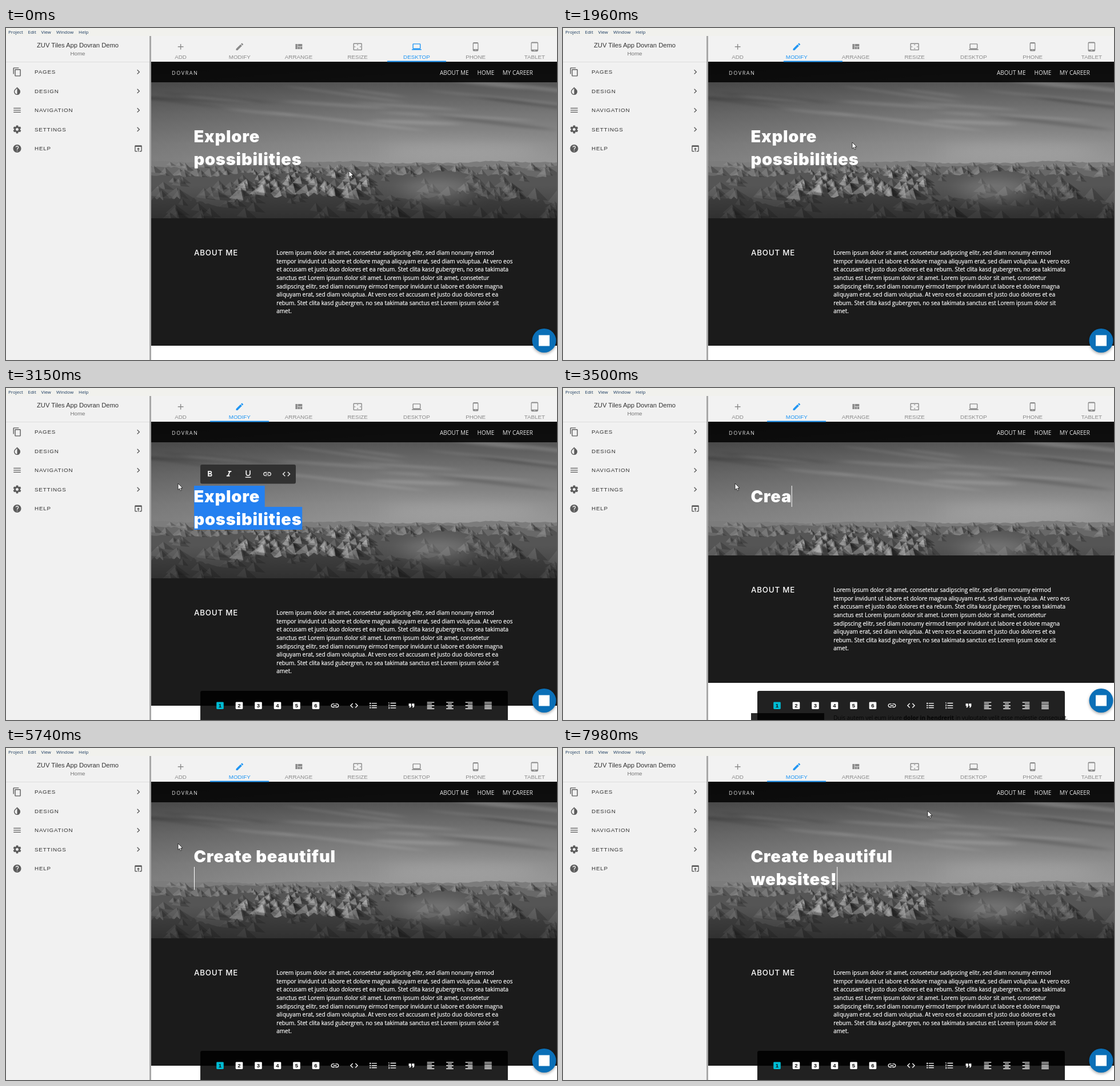
An HTML page that plays this animation: 964 by 581 pixels, repeating every 8000 ms.

```html
<!DOCTYPE html>
<html lang="en">
<head>
<meta charset="utf-8">
<title>Site editor</title>
<style>
  html, body { margin: 0; width: 100%; height: 100%; overflow: hidden; background: #fff; }
  svg { display: block; width: 100%; height: 100%; }
  text { white-space: pre; }
  .ui { font-family: "Liberation Sans", Arial, sans-serif; }
  .site { font-family: "Open Sans", "Noto Sans", sans-serif; }
  .head { font-family: Inter, Roboto, sans-serif; }
</style>
</head>
<body>
<svg id="stage" viewBox="0 0 964 581">
  <defs>
    <linearGradient id="sky" gradientUnits="userSpaceOnUse" x1="0" y1="60" x2="0" y2="240">
      <stop offset="0" stop-color="#484848"/>
      <stop offset=".2" stop-color="#575757"/>
      <stop offset=".5" stop-color="#777"/>
      <stop offset=".8" stop-color="#8f8f8f"/>
      <stop offset="1" stop-color="#989898"/>
    </linearGradient>
    <linearGradient id="side">
      <stop offset="0" stop-opacity=".16"/>
      <stop offset=".6" stop-opacity="0"/>
    </linearGradient>
    <linearGradient id="low" x2="0" y2="1">
      <stop offset="0" stop-opacity="0"/>
      <stop offset="1" stop-opacity=".3"/>
    </linearGradient>
    <filter id="soft" x="-50%" y="-200%" width="200%" height="500%"><feGaussianBlur stdDeviation="9 2"/></filter>
    <filter id="haze" x="-80%" y="-80%" width="260%" height="260%"><feGaussianBlur stdDeviation="22 12"/></filter>
    <filter id="drop" x="-30%" y="-30%" width="160%" height="160%"><feGaussianBlur stdDeviation="2.5"/></filter>
    <clipPath id="view"><rect x="254" y="59" width="710" height="522"/></clipPath>
  </defs>
</svg>
<script>
const LOOP = 8000, TICK = 70, BLUE = '#2196f3', GREY = '#8a8a8a';
const stage = document.getElementById('stage');

function el(tag, attrs, parent = stage) {
  const node = document.createElementNS('http://www.w3.org/2000/svg', tag);
  for (const k in attrs) node.setAttribute(k, attrs[k]);
  parent.appendChild(node);
  return node;
}
const rect = (x, y, width, height, fill, parent, more) =>
  el('rect', { x, y, width, height, fill, ...more }, parent);
function label(str, x, y, size, cls, fill, parent, more) {
  const node = el('text', { x, y, 'font-size': size, class: cls, fill, ...more }, parent);
  node.textContent = str;
  return node;
}
// 24-unit icon centred on a point
const icon = (d, cx, cy, parent, fill) =>
  el('path', { d, fill, transform: `translate(${cx - 8.4} ${cy - 8.4}) scale(.7)` }, parent);
const bars = (short, from) => [0, 1, 2, 3, 4]
  .map(i => i % 2 ? `M${from} ${3 + 4 * i}h${short}v2h-${short}z` : `M3 ${3 + 4 * i}h18v2h-18z`).join('');

const ICON = {
  copy: 'M16 1H4c-1.1 0-2 .9-2 2v14h2V3h12V1zm3 4H8c-1.1 0-2 .9-2 2v14c0 1.1.9 2 2 2h11c1.1 0 2-.9 2-2V7c0-1.1-.9-2-2-2zm0 16H8V7h11v14z',
  drop: 'M17.66 7.93L12 2.27 6.34 7.93c-3.12 3.12-3.12 8.19 0 11.31C7.9 20.8 9.95 21.58 12 21.58c2.05 0 4.1-.78 5.66-2.34 3.12-3.12 3.12-8.19 0-11.31zM12 19.59c-1.6 0-3.11-.62-4.24-1.76C6.62 16.69 6 15.19 6 13.59s.62-3.11 1.76-4.24L12 5.1v14.49z',
  menu: 'M3 18h18v-2H3v2zm0-5h18v-2H3v2zm0-7v2h18V6H3z',
  gear: 'M19.43 12.98c.04-.32.07-.64.07-.98s-.03-.66-.07-.98l2.11-1.65c.19-.15.24-.42.12-.64l-2-3.46c-.12-.22-.39-.3-.61-.22l-2.49 1c-.52-.4-1.08-.73-1.69-.98l-.38-2.65C14.46 2.18 14.25 2 14 2h-4c-.25 0-.46.18-.49.42l-.38 2.65c-.61.25-1.17.59-1.69.98l-2.49-1c-.23-.09-.49 0-.61.22l-2 3.46c-.13.22-.07.49.12.64l2.11 1.65c-.04.32-.07.65-.07.98s.03.66.07.98l-2.11 1.65c-.19.15-.24.42-.12.64l2 3.46c.12.22.39.3.61.22l2.49-1c.52.4 1.08.73 1.69.98l.38 2.65c.03.24.24.42.49.42h4c.25 0 .46-.18.49-.42l.38-2.65c.61-.25 1.17-.59 1.69-.98l2.49 1c.23.09.49 0 .61-.22l2-3.46c.12-.22.07-.49-.12-.64l-2.11-1.65zM12 15.5c-1.93 0-3.5-1.57-3.5-3.5s1.57-3.5 3.5-3.5 3.5 1.57 3.5 3.5-1.57 3.5-3.5 3.5z',
  help: 'M12 2C6.48 2 2 6.48 2 12s4.48 10 10 10 10-4.48 10-10S17.52 2 12 2zm1 17h-2v-2h2v2zm2.07-7.75l-.9.92C13.45 12.9 13 13.5 13 15h-2v-.5c0-1.1.45-2.1 1.17-2.83l1.24-1.26c.37-.36.59-.86.59-1.41 0-1.1-.9-2-2-2s-2 .9-2 2H8c0-2.21 1.79-4 4-4s4 1.79 4 4c0 .88-.36 1.68-.93 2.25z',
  open: 'M19 4H5c-1.11 0-2 .9-2 2v12c0 1.1.89 2 2 2h4v-2H5V8h14v10h-4v2h4c1.1 0 2-.9 2-2V6c0-1.1-.89-2-2-2zm-7 6l-4 4h3v6h2v-6h3l-4-4z',
  next: 'M10 6L8.59 7.41 13.17 12l-4.58 4.59L10 18l6-6z',
  add: 'M19 13h-6v6h-2v-6H5v-2h6V5h2v6h6v2z',
  edit: 'M3 17.25V21h3.75L17.81 9.94l-3.75-3.75L3 17.25zM20.71 7.04c.39-.39.39-1.02 0-1.41l-2.34-2.34c-.39-.39-1.02-.39-1.41 0l-1.83 1.83 3.75 3.75 1.83-1.83z',
  quilt: 'M10 18h5v-6h-5v6zm-6 0h5V5H4v13zm12 0h5v-6h-5v6zM10 5v6h11V5H10z',
  resize: 'M12.01 5.5L10 8h4l-1.99-2.5zM18 10v4l2.5-1.99L18 10zM6 10l-2.5 2.01L6 14v-4zm8 6h-4l2.01 2.5L14 16zm7-13H3c-1.1 0-2 .9-2 2v14c0 1.1.9 2 2 2h18c1.1 0 2-.9 2-2V5c0-1.1-.9-2-2-2zm0 16.01H3V4.99h18v14.02z',
  laptop: 'M20 18c1.1 0 1.99-.9 1.99-2L22 6c0-1.1-.9-2-2-2H4c-1.1 0-2 .9-2 2v10c0 1.1.9 2 2 2H0v2h24v-2h-4zM4 6h16v10H4V6z',
  phone: 'M16 1H8C6.34 1 5 2.34 5 4v16c0 1.66 1.34 3 3 3h8c1.66 0 3-1.34 3-3V4c0-1.66-1.34-3-3-3zm-2 20h-4v-1h4v1zm3.25-3H6.75V4h10.5v14z',
  tablet: 'M18 0H6C4.34 0 3 1.34 3 3v18c0 1.66 1.34 3 3 3h12c1.66 0 3-1.34 3-3V3c0-1.66-1.34-3-3-3zm-4 22h-4v-1h4v1zm5.25-3H4.75V3h14.5v16z',
  link: 'M3.9 12c0-1.71 1.39-3.1 3.1-3.1h4V7H7c-2.76 0-5 2.24-5 5s2.24 5 5 5h4v-1.9H7c-1.71 0-3.1-1.39-3.1-3.1zM8 13h8v-2H8v2zm9-6h-4v1.9h4c1.71 0 3.1 1.39 3.1 3.1s-1.39 3.1-3.1 3.1h-4V17h4c2.76 0 5-2.24 5-5s-2.24-5-5-5z',
  code: 'M9.4 16.6L4.8 12l4.6-4.6L8 6l-6 6 6 6 1.4-1.4zm5.2 0l4.6-4.6-4.6-4.6L16 6l6 6-6 6-1.4-1.4z',
  list: [5, 10.5, 16].map(y => `M3 ${y}h3v3h-3zM8 ${y + .5}h13v2h-13z`).join(''),
  steps: 'M2 17h2v.5H3v1h1v.5H2v1h3v-4H2v1zm1-9h1V4H2v1h1v3zm-1 3h1.8L2 13.1v.9h3v-1H3.2L5 10.9V10H2v1zm5-6v2h14V5H7zm0 14h14v-2H7v2zm0-6h14v-2H7v2z',
  quote: 'M6 17h3l2-4V7H5v6h3zm8 0h3l2-4V7h-6v6h3z',
  left: bars(12, 3), center: bars(10, 7), right: bars(12, 9), full: bars(18, 3),
  bold: 'M15.6 10.79c.97-.67 1.65-1.77 1.65-2.79 0-2.26-1.75-4-4-4H7v14h7.04c2.09 0 3.71-1.7 3.71-3.79 0-1.52-.86-2.82-2.15-3.42zM10 6.5h3c.83 0 1.5.67 1.5 1.5s-.67 1.5-1.5 1.5h-3v-3zm3.5 9H10v-3h3.5c.83 0 1.5.67 1.5 1.5s-.67 1.5-1.5 1.5z',
  italic: 'M10 4v3h2.21l-3.42 8H6v3h8v-3h-2.21l3.42-8H18V4z',
  under: 'M12 17c3.31 0 6-2.69 6-6V3h-2.5v8c0 1.93-1.57 3.5-3.5 3.5S8.5 12.93 8.5 11V3H6v8c0 3.31 2.69 6 6 6zm-7 2v2h14v-2H5z'
};

// Hero: sky, cloud streaks, mountain ridges
let seed = 11;
const rnd = () => (seed = seed * 16807 % 2147483647) / 2147483647;
const site = el('g', { 'clip-path': 'url(#view)' });
rect(254, 59, 710, 300, 'url(#sky)', site);
for (let i = 0; i < 18; i++) {
  const cx = 300 + rnd() * 680, cy = 98 + rnd() * 70;
  el('ellipse', { cx, cy, rx: 50 + rnd() * 90, ry: 1.5 + rnd() * 2, fill: i % 3 ? '#fff' : '#000',
    opacity: .15, filter: 'url(#soft)', transform: `rotate(${2 + rnd() * 6} ${cx} ${cy})` }, site);
}
el('ellipse', { cx: 800, cy: 215, rx: 140, ry: 16, fill: '#fff', opacity: .12, filter: 'url(#haze)' }, site);
rect(254, 59, 710, 181, 'url(#side)', site);

function ridge(base, amp, fill) {
  let d = 'M254 340';
  const shift = rnd() * 9;
  for (let x = 254; x < 972; x += 5) {
    const wave = Math.sin(x / 47 + shift) * .5 + Math.sin(x / 19 + shift * 2) * .3;
    d += `L${x} ${(base + amp * (wave + rnd() * .6 - .3)).toFixed(1)}`;
  }
  el('path', { d: d + 'V340z', fill }, site);
}
// Slopes: a lit left face beside a shaded right face, larger towards the viewer
function slopes(count, x0, x1, y0, y1, light, opacity) {
  for (let i = 0; i < count; i++) {
    const depth = (i + rnd()) / count, x = x0 + rnd() * (x1 - x0), y = y0 + depth * (y1 - y0);
    const h = 4 + depth * 16 + rnd() * 5, w = h * (.7 + rnd() * .8);
    const top = `M${x} ${y}l${w * .2} ${h}`;
    el('path', { d: `${top}l${-w} ${-h * .15}z`, fill: light, opacity }, site);
    el('path', { d: `${top}l${w} ${h * .1}z`, fill: '#1c1c1c', opacity: opacity * .9 }, site);
  }
}
ridge(235, 3, '#7c7c7c');
ridge(242, 4, '#686868');
slopes(110, 254, 964, 234, 250, '#9a9a9a', .3);
ridge(256, 7, '#555');
slopes(90, 254, 964, 252, 285, '#888', .28);
slopes(60, 410, 640, 246, 280, '#c4c4c4', .42);
ridge(298, 14, '#444');
slopes(70, 254, 964, 285, 325, '#6c6c6c', .3);
el('ellipse', { cx: 755, cy: 285, rx: 62, ry: 22, fill: '#bbb', opacity: .32, filter: 'url(#haze)' }, site);
rect(254, 275, 710, 60, 'url(#low)', site);

// Site header
rect(254, 59, 710, 36, '#000', site, { opacity: .83 });
label('DOVRAN', 290, 81.5, 9, 'site', '#ddd', site, { 'letter-spacing': 1.6 });
[['ABOUT ME', 759], ['HOME', 824.5], ['MY CAREER', 868.7]]
  .forEach(([s, x]) => label(s, x, 81.6, 10, 'site', '#e4e4e4', site));

// Sections that slide with the height of the heading
const page = el('g', {}, site);
rect(254, 333, 710, 223, '#1b1b1b', page);
rect(254, 556, 710, 120, '#fff', page);
label('ABOUT ME', 329, 398, 13.3, 'head', '#fff', page, { 'letter-spacing': .8, 'font-weight': 500 });
['Lorem ipsum dolor sit amet, consetetur sadipscing elitr, sed diam nonumy eirmod',
 'tempor invidunt ut labore et dolore magna aliquyam erat, sed diam voluptua. At vero eos',
 'et accusam et justo duo dolores et ea rebum. Stet clita kasd gubergren, no sea takimata',
 'sanctus est Lorem ipsum dolor sit amet. Lorem ipsum dolor sit amet, consetetur',
 'sadipscing elitr, sed diam nonumy eirmod tempor invidunt ut labore et dolore magna',
 'aliquyam erat, sed diam voluptua. At vero eos et accusam et justo duo dolores et ea',
 'rebum. Stet clita kasd gubergren, no sea takimata sanctus est Lorem ipsum dolor sit',
 'amet.'].forEach((s, i) => label(s, 473.3, 397 + i * 14.64, 9.97, 'site', '#fff', page,
  { stroke: '#fff', 'stroke-width': .2 }));
rect(329, 609, 128, 60, '#2c2c2c', page);
const duis = label('Duis autem vel eum iriure ', 473.3, 620.5, 9.97, 'site', '#222', page);
el('tspan', { 'font-weight': 700 }, duis).textContent = 'dolor in hendrerit';
el('tspan', {}, duis).textContent = ' in vulputate velit esse molestie consequat,';

// Editable heading
const LEFT = 329, ROWS = [[171, 37], [208, 40]];
const marks = ROWS.map(([y, h]) => rect(LEFT, y, 0, h, '#2480f0', site));
const lines = [200.2, 239.9].map(y => label('', LEFT - .6, y, 29, 'head', '#fff', site,
  { 'font-weight': 900, 'letter-spacing': .8 }));
const caret = rect(LEFT, 171, 1, 37, '#fff', site);

// Floating format bar and bottom block bar
const popup = el('g', {});
rect(340, 134, 167, 33.5, '#2e2e2e', popup, { rx: 3, opacity: .95 });
['bold', 'italic', 'under', 'link', 'code']
  .forEach((k, i) => icon(ICON[k], 356.6 + i * 33.5, 150.6, popup, '#eee'));

const dock = el('g', {});
rect(340, 530, 538, 56, '#000', dock, { rx: 3, opacity: .87 });
for (let i = 0; i < 6; i++) {
  const x = 374.5 + i * 33.5;
  rect(x - 6.3, 549.4, 12.6, 12.6, i ? '#fff' : '#00bcd4', dock, { rx: 1.4 });
  label(i + 1, x, 559.3, 9.6, 'ui', '#111', dock, { 'text-anchor': 'middle', 'font-weight': 700 });
}
['link', 'code', 'list', 'steps', 'quote', 'left', 'center', 'right', 'full']
  .forEach((k, i) => icon(ICON[k], 575.5 + i * 33.5, 555.7, dock, '#fff'));

// Chat button
el('circle', { cx: 941.5, cy: 549, r: 21, opacity: .35, filter: 'url(#drop)' });
el('circle', { cx: 941.5, cy: 547, r: 21, fill: '#0a6fb7' });
rect(932, 537.5, 19, 19, '#fff');

// Application frame
rect(0, 0, 964, 59, '#f2f2f2');
rect(0, 0, 251, 581, '#f1f1f1');
rect(0, 0, 964, 14, '#f1f1ed');
rect(0, 59, 251, 1, '#dcdcdc');
rect(251, 14, 3, 567, '#a8a8a8');
[['Project', 4], ['Edit', 38.5], ['View', 61.5], ['Window', 88], ['Help', 127]]
  .forEach(([s, x]) => label(s, x, 10.4, 8, 'site', '#17375e'));
const mid = { 'text-anchor': 'middle' };
label('ZUV Tiles App Dovran Demo', 125.5, 33.6, 11.2, 'ui', '#333', stage, mid);
label('Home', 125.5, 47.6, 9.8, 'ui', '#777', stage, mid);
[['PAGES', 'copy'], ['DESIGN', 'drop'], ['NAVIGATION', 'menu'], ['SETTINGS', 'gear'], ['HELP', 'help']].forEach(([s, k], i) => {
  const y = 76.9 + i * 33.5;
  label(s, 50, y + 3.5, 9.8, 'ui', '#333', stage, { 'letter-spacing': .84 });
  icon(ICON[i < 4 ? 'next' : 'open'], 231.5, y, stage, '#5c5c5c');
  icon(ICON[k], 19.5, y, stage, '#5c5c5c');
});

const tabs = [['ADD', 'add'], ['MODIFY', 'edit'], ['ARRANGE', 'quilt'], ['RESIZE', 'resize'],
  ['DESKTOP', 'laptop'], ['PHONE', 'phone'], ['TABLET', 'tablet']].map(([s, k], i) => {
  const x = 305.6 + i * 103.2, g = el('g', { fill: GREY });
  el('path', { d: ICON[k], transform: `translate(${x - 8.4} 24.4) scale(.7)` }, g);
  el('text', { x, y: 53.8, 'font-size': 9.8, class: 'ui', ...mid }, g).textContent = s;
  return g;
});
const ink = rect(667, 57.5, 103, 2, BLUE);

const arrow = el('path', { d: 'M0 0V11.2L2.6 8.8L4.4 12.8L6.2 12L4.5 8.1H8z', fill: '#fff', stroke: '#111', 'stroke-width': .8 });
const beam = el('path', { d: 'M-3 -6h2.3l.7 .7l.7-.7h2.3M0-5.3V5.3M-3 6h2.3l.7-.7l.7 .7h2.3', fill: 'none', stroke: '#222' });

// Motion: [time, x, y] of the pointer, and the time of each key press
const PATH = [[910, 600, 250], [1260, 500, 120], [1470, 425, 40], [1610, 418, 36], [1750, 425, 40],
  [1820, 436, 57], [1890, 470, 115], [1960, 506, 200], [2100, 521, 234], [2240, 520, 236],
  [2520, 366, 167], [2590, 324, 158], [2660, 310, 160], [2800, 301, 167], [7280, 301, 167],
  [7350, 294, 152], [7420, 289, 145], [7560, 289, 145], [7980, 638, 110]];
const TYPED = 'Create beautiful\nwebsites!';
const KEYS = [3220, 3360, 3430, 3500, 3640, 3710, 3710, 4760, 4830, 4970, 5040, 5110, 5250, 5320, 5390, 5530,
  5740, 6020, 6090, 6300, 6370, 6510, 6580, 6650, 6720, 6930];

const clamp = p => Math.max(0, Math.min(1, p));
const ease = p => p < .5 ? 4 * p ** 3 : 1 - 4 * (1 - p) ** 3;
const phase = (t, from, span) => ease(clamp((t - from) / span));
const show = (node, on) => node.setAttribute('visibility', on ? 'visible' : 'hidden');

function pointer(t) {
  const i = PATH.findIndex(p => p[0] > t);
  if (i === 0) return PATH[0].slice(1);
  if (i < 0) return PATH[PATH.length - 1].slice(1);
  const [t0, x0, y0] = PATH[i - 1], [t1, x1, y1] = PATH[i], p = (t - t0) / (t1 - t0);
  return [x0 + (x1 - x0) * p, y0 + (y1 - y0) * p];
}

// Select from the nearest letter edge at x to the end of the row
function mark(row, x, on) {
  const line = lines[row], end = line.getComputedTextLength() + (row ? 0 : 8);
  let from = 0;
  for (let n = 1; on && n <= line.textContent.length; n++) {
    const edge = line.getSubStringLength(0, n);
    if (LEFT + edge <= x) from = edge;
  }
  marks[row].setAttribute('x', LEFT + from);
  marks[row].setAttribute('width', on ? Math.max(0, end - from) : 0);
}

function draw(time) {
  const t = Math.floor(time % LOOP / TICK) * TICK;
  const [mx, my] = pointer(t);
  const inText = t >= 2030 && t < 2640;
  arrow.setAttribute('transform', `translate(${mx} ${my})`);
  beam.setAttribute('transform', `translate(${mx} ${my})`);
  show(arrow, !inText);
  show(beam, inText);

  const modify = t >= 1610;
  tabs[1].setAttribute('fill', modify ? BLUE : GREY);
  tabs[4].setAttribute('fill', modify ? GREY : BLUE);
  ink.setAttribute('x', 667 - 310 * phase(t, 1610, 490));

  const count = KEYS.filter(k => k <= t).length;
  const rows = count ? TYPED.slice(0, count).split('\n') : ['Explore', 'possibilities'];
  lines.forEach((line, i) => line.textContent = rows[i] || '');
  page.setAttribute('transform', `translate(0 ${rows.length < 2 ? -40 : 0})`);

  const marking = t >= 2240 && !count, top = my < 208 || t > 2590;
  mark(0, t > 2590 ? LEFT : mx, marking && top);
  mark(1, top ? LEFT : mx, marking);

  const row = rows.length - 1;
  const lit = count && Math.floor((t - KEYS[count - 1]) / 455) % 2 === 0;
  show(caret, lit);
  caret.setAttribute('x', LEFT + Math.max(0, lines[row].getComputedTextLength() - 1));
  caret.setAttribute('y', ROWS[row][0]);
  caret.setAttribute('height', ROWS[row][1]);

  popup.setAttribute('opacity', count ? 0 : clamp((t - 2730) / 350));
  dock.setAttribute('transform', `translate(0 ${52 * (1 - phase(t, 2310, 424))})`);
}

function tick() {
  draw(performance.now());
  requestAnimationFrame(tick);
}
tick();
</script>
</body>
</html>
```
